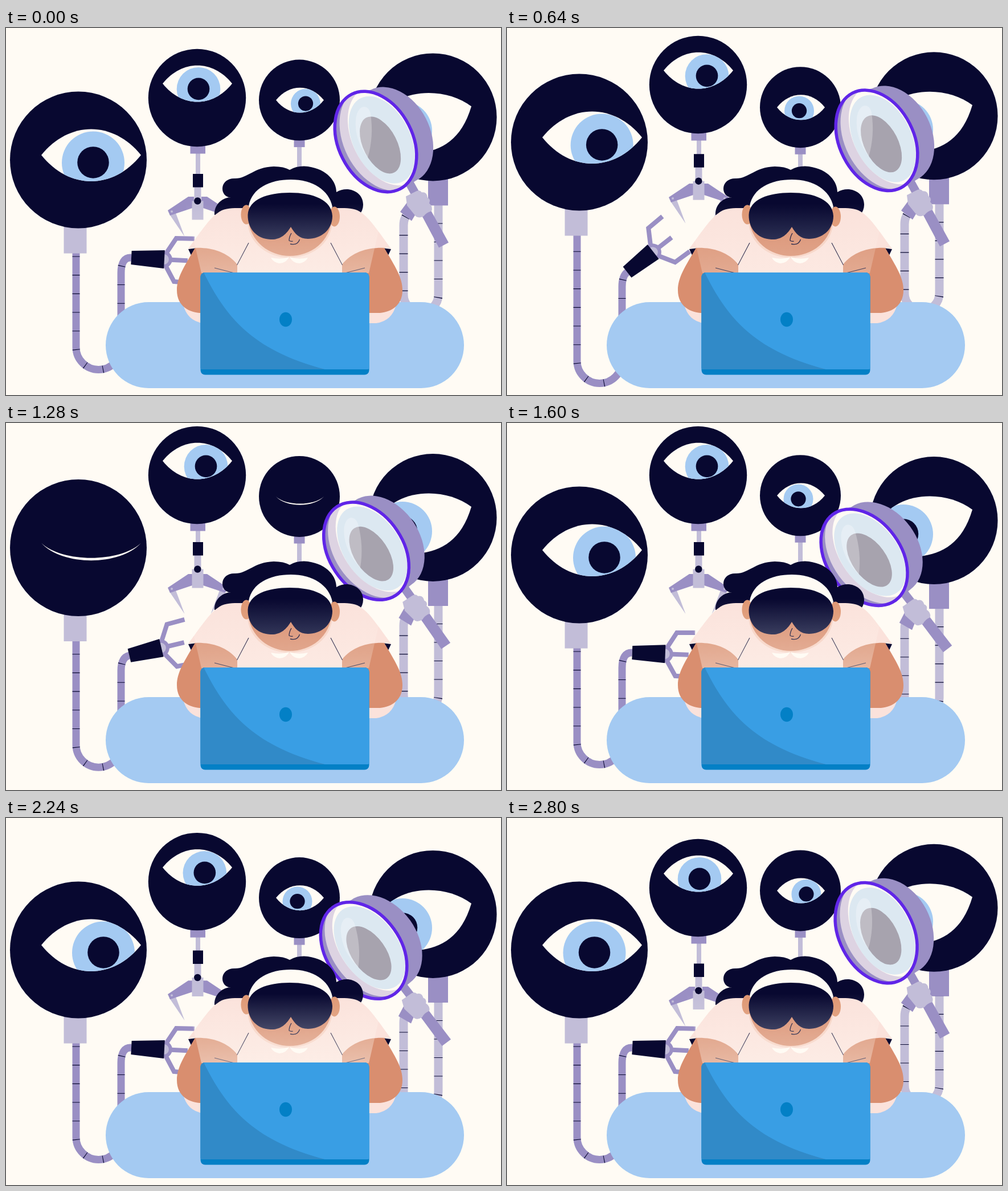
An HTML page with a canvas for the animation above (2880 ms loop, 869x644 px).

```html
<!DOCTYPE html>
<html lang="en">
<head>
<meta charset="utf-8">
<title>Watching eyes</title>
<style>
html, body { margin: 0; width: 100%; height: 100%; overflow: hidden; background: #fffbf4; }
canvas { display: block; }
</style>
</head>
<body>
<canvas id="stage" width="869" height="644"></canvas>
<script>
const ctx = document.getElementById('stage').getContext('2d');
const LOOP = 2880, TAU = Math.PI * 2, RAD = Math.PI / 180;
const CREAM = '#fffbf4', INK = '#080830', MAUVE = '#9a8fc4', LILAC = '#c2bdd8',
  SKY = '#a4caf2', VIOLET = '#6025e8', SKIN = '#d98e6f', SHIRT = '#fbe2db';

// Easing and timing
const ramp = (t, from, to) => {
  const p = Math.min(1, Math.max(0, (t - from) / (to - from)));
  return p * p * (3 - 2 * p);
};
const pulse = (t, a, b, c, d) => ramp(t, a, b) - ramp(t, c, d);
const wave = (t, peak, period) => Math.cos(TAU * (t - peak) / period);
const lidOpen = (t, shutAt) => ramp(Math.abs(t - shutAt), 25, 190);

// Drawing helpers
function fill(color, path) {
  ctx.fillStyle = color;
  ctx.fill(typeof path === 'string' ? new Path2D(path) : path);
}
function line(color, width, path) {
  ctx.strokeStyle = color;
  ctx.lineWidth = width;
  ctx.stroke(typeof path === 'string' ? new Path2D(path) : path);
}
function rect(color, x0, y0, x1, y1) {
  ctx.fillStyle = color;
  ctx.fillRect(x0, y0, x1 - x0, y1 - y0);
}
function oval(x, y, rx, ry = rx) {
  const p = new Path2D();
  p.ellipse(x, y, rx, ry, 0, 0, TAU);
  return p;
}
function box(x, y, w, h, r) {
  const p = new Path2D();
  p.roundRect(x, y, w, h, r);
  return p;
}
function group(draw) {
  ctx.save();
  draw();
  ctx.restore();
}
function mirrored(axis, draw) {
  draw();
  group(() => {
    ctx.translate(2 * axis, 0);
    ctx.scale(-1, 1);
    draw();
  });
}
function hose(color, width, gap, path) {
  line(color, width, path);
  group(() => {
    ctx.setLineDash([1.1, gap - 1.1]);
    line(INK, width, path);
  });
}

function iris(x, y, r) {
  fill(SKY, oval(x, y, r));
  fill(INK, oval(x, y - r * 0.01, r * 0.505));
}

// lid: centre and half width of the opening, relative to the head centre
function eye(x, y, r, lid, look, open) {
  fill(INK, oval(x, y, r));
  const lx = x + lid.x, ly = y + lid.y, w = lid.w;
  const top = ly + w * (0.3 - 0.82 * open) * 4 / 3;
  const bottom = ly + w * (0.35 + 0.175 * open) * 4 / 3;
  const pull = w * (0.58 - 0.14 * open);
  const opening = new Path2D(`M${lx - w} ${ly}
    C${lx - pull} ${top} ${lx + pull} ${top} ${lx + w} ${ly}
    C${lx + pull} ${bottom} ${lx - pull} ${bottom} ${lx - w} ${ly}Z`);
  fill(CREAM, opening);
  if (open < 0.05) return;
  group(() => {
    ctx.clip(opening);
    iris(x + look.x, y + look.y, look.r);
  });
}

function leftEye(t) {
  const y = 231.5 - 31 * pulse(t, 0, 570, 960, 1525);
  const drop = 24 * pulse(t, 0, 540, 855, 1450);
  const bend = pulse(t, 0, 600, 757, 1679);
  const angle = (3 - 41 * bend) * RAD;
  const gx = 220 - 9 * bend, gy = 403 + drop * 1.06;
  const cy = gy - Math.tan(angle) * (gx - 202);

  hose(MAUVE, 13, 32.7, `M123 ${204.2 + drop} V${560 + drop} A39.5 39.5 0 0 0 202 ${560 + drop}
    V${430 + drop} Q202 ${cy} ${gx} ${gy}`);
  group(() => {
    ctx.translate(gx, gy);
    ctx.rotate(angle);
    line(MAUVE, 8, 'M62 -13 L77 -38 L109 -39 M65 0 H99 M62 13 L77 38 L109 39');
    fill(MAUVE, 'M57 -15 A15 15 0 0 1 57 15Z');
    fill(LILAC, 'M57 -9 A9 9 0 0 1 57 9Z');
    fill(INK, 'M0 -12 L58 -16 V16 L0 12Z');
  });
  rect(LILAC, 101.5, y + 110, 141.5, y + 164);
  eye(127, y, 120, { x: 22.5, y: -8.5, w: 87.5 },
    { x: 26 + 18 * pulse(t, 300, 800, 2385, 2846), y: 5, r: 55 }, lidOpen(t, 1280));
}

function clawEye(t) {
  const y = 122.5 - 31 * pulse(t, 0, 960, 1645, 2635);
  const joint = 303.5 - 47 * pulse(t, 0, 960, 1600, 2880);
  group(() => {
    ctx.translate(0, y - 122.5);
    mirrored(336.5, () => {
      fill(LILAC, 'M287 327 L297 322 L313.5 366Z');
      fill(MAUVE, 'M284 320 L320 296 H330 V315 L288 329Z');
      fill(LILAC, oval(291, 322, 2));
    });
  });
  rect(LILAC, 333, y + 84, 341, joint);
  rect(LILAC, 330.5, joint - 26, 342.5, joint + 4);
  rect(LILAC, 326.5, joint, 346.5, joint + 33);
  rect(INK, 328, joint - 47.5, 346, joint - 24);
  fill(INK, oval(336.3, joint, 6.2));
  rect(MAUVE, 323.5, y + 80, 350, y + 98);
  eye(335.5, y, 85.7, { x: 0.5, y: -25, w: 61 },
    { x: 2.5 + 13 * pulse(t, 150, 620, 2100, 2640), y: -15.3, r: 38.3 }, lidOpen(t, 960));
}

function smallEye(t) {
  const y = 133.3 - 6.9 * wave(t, 45, 1440);
  rect(LILAC, 511, y + 70, 519, 265);
  rect(MAUVE, 505.5, y + 65, 524.5, y + 82.5);
  eye(515, y, 71, { x: 1, y: 0, w: 42 },
    { x: 11 - 14.5 * pulse(t, 208, 748, 2325, 2865), y: 6.3, r: 26 }, lidOpen(t, 1280));
}

function magnifier() {
  // handle
  line(MAUVE, 15, 'M703 262 L724 300');
  fill(MAUVE, 'M728 325 L745 318 L777 376 L760 385Z');
  fill(MAUVE, 'M692 322 L706 303 L724 318 L712 338Z');
  fill(LILAC, `M702 295 Q712 290 720 286 Q726 283 730 288 Q739 287 740 297
    Q746 300 743 307 Q750 313 747 321 Q738 323 733 330 Q722 335 717 327 L704 311Z`);
  // lens
  group(() => {
    ctx.translate(649, 199);
    ctx.rotate(-27 * RAD);
    fill(MAUVE, 'M0 -96 L33 -85 A64 89 0 0 1 33 93 L0 96Z');
    const rim = oval(0, 0, 67, 95.5);
    fill(MAUVE, rim);
    group(() => {
      ctx.clip(rim);
      fill('#ddd3e2', oval(12, 0, 67, 97));
      fill(CREAM, oval(21, 0, 60, 92));
      fill('#dce8f1', oval(11, 2, 50, 82));
      fill('#a7a3ae', oval(4.5, 9, 29.7, 54));
    });
    line(VIOLET, 5.5, oval(0, 0, 65, 93.3));
  });
  fill('rgba(255,255,255,.27)',
    'M614 160 C617 133 636 132 640 150 Q646 190 635 227 Q611 195 614 160Z');
}

function rightEye(t) {
  const y = 162.7 - 9.7 * wave(t, 400, LOOP);
  const shift = y - 156;
  group(() => {
    ctx.translate(0, shift);
    hose(LILAC, 15, 32.5,
      'M759 277 V467.5 A30.5 30.5 0 0 1 698 467.5 V346 Q698 331 708 324');
    rect(MAUVE, 741, 250, 776, 311);
  });
  group(() => {
    ctx.translate(749.5, y);
    fill(INK, oval(0, 0, 112));
    const opening = new Path2D(
      'M-100 10 C-70 -53 20 -55 67.5 -19 C50 40 15 58 -25 63 Q-80 60 -100 10Z');
    fill(CREAM, opening);
    ctx.clip(opening);
    iris(-53.5, 24, 52);
  });
  group(() => {
    ctx.translate(776, 349 + shift);
    ctx.rotate(-9 * RAD * pulse(t, 885, 1480, 2140, 2890));
    ctx.translate(-776, -349);
    magnifier();
  });
}

function person() {
  fill(INK, `M391 297 C374 292 376 263 402 264 C425 264 435 244 470 243
    Q488 243 498 249 Q512 241 530 243 C565 248 580 270 580 288
    C600 276 627 287 627 310 Q627 320 620 328 H366 C365 308 382 297 395 297Z`);

  mirrored(498, () => {
    fill(SHIRT, 'M311 485 Q318 514 346 518 H370 V485Z');
    fill(INK, 'M320 388 L336 386 L327 403Z');
    fill(SKIN, `M333 384 C312 420 300 438 300 460 C300 490 325 501 346 500
      H370 V432 H410 V400 L380 380Z`);
  });
  fill(SHIRT, `M320 387 C337 365 355 336 371 325 C383 315 398 316 415 316 H581
    C598 316 613 315 625 325 C641 336 659 365 676 387
    C645 383 611 389 590 415 V432 H406 V415 C385 389 351 383 320 387Z`);
  line(INK, 1.1, 'M426 377 L405.5 416 M366 421 L401 430 M570 377 L590.5 416 M630 421 L595 430');

  // head
  fill('#f6d0c1', 'M424 338 C425 380 462 403 497 403 C535 403 572 380 573 338Z');
  fill(SKIN, 'M425 330 C426 376 464 400 498 400 C534 400 571 376 572 330Z');
  mirrored(497.5, () => fill(CREAM, 'M497 402 Q491 413 480 413 Q469 411 465 403 Q482 407 497 402Z'));
  fill('#de9672', oval(422, 327.5, 9.5, 17));
  fill('#de9672', oval(576.5, 331, 9.5, 17.5));
  fill(CREAM, 'M426 312 C432 281 463 266 500 266 C538 266 567 284 573 314 L565 325 H432Z');
  const visor = ctx.createLinearGradient(0, 315, 0, 371);
  visor.addColorStop(0, INK);
  visor.addColorStop(1, '#0c113b');
  fill(visor, `M424.5 328 C426 300 460 289 498 289 C540 289 572 302 573 330
    C573 355 552 370 530 370 C515 370 507 361 500 349
    C492 362 482 372 464 371 C440 370 424 352 424.5 328Z`);
  line(INK, 1.3, 'M501 360 Q497 367 497 373 Q500 375 503.5 374 M499 379 Q512 382 515.5 371');
}

function glow(t) {
  const light = ctx.createLinearGradient(0, 308, 0, 430);
  light.addColorStop(0, 'rgba(255,251,244,0)');
  light.addColorStop(1, `rgba(255,251,244,${0.35 + 0.1 * wave(t, 2250, LOOP)})`);
  fill(light, 'M343 430 H637 L666 305 H314Z');
}

function laptop() {
  fill('#0380c6', box(341.5, 429, 296, 179.5, 8));
  const lid = box(341.5, 429, 296, 170, [8, 8, 3, 3]);
  fill('#399ee4', lid);
  group(() => {
    ctx.clip(lid);
    fill('#318ac8', 'M341 429 H347 C385 505 430 565 560 599 H341Z');
  });
  fill('#0380c6', oval(491, 511.5, 11, 12.7));
}

function render(now) {
  const t = now % LOOP;
  rect(CREAM, 0, 0, 869, 644);
  leftEye(t);
  clawEye(t);
  smallEye(t);
  rightEye(t);
  fill(SKY, box(175, 481, 629, 151, 75.5));
  person();
  glow(t);
  laptop();
}

let start;
function tick(now) {
  start ??= now;
  render(now - start);
  requestAnimationFrame(tick);
}
render(0);
requestAnimationFrame(tick);
</script>
</body>
</html>
```
